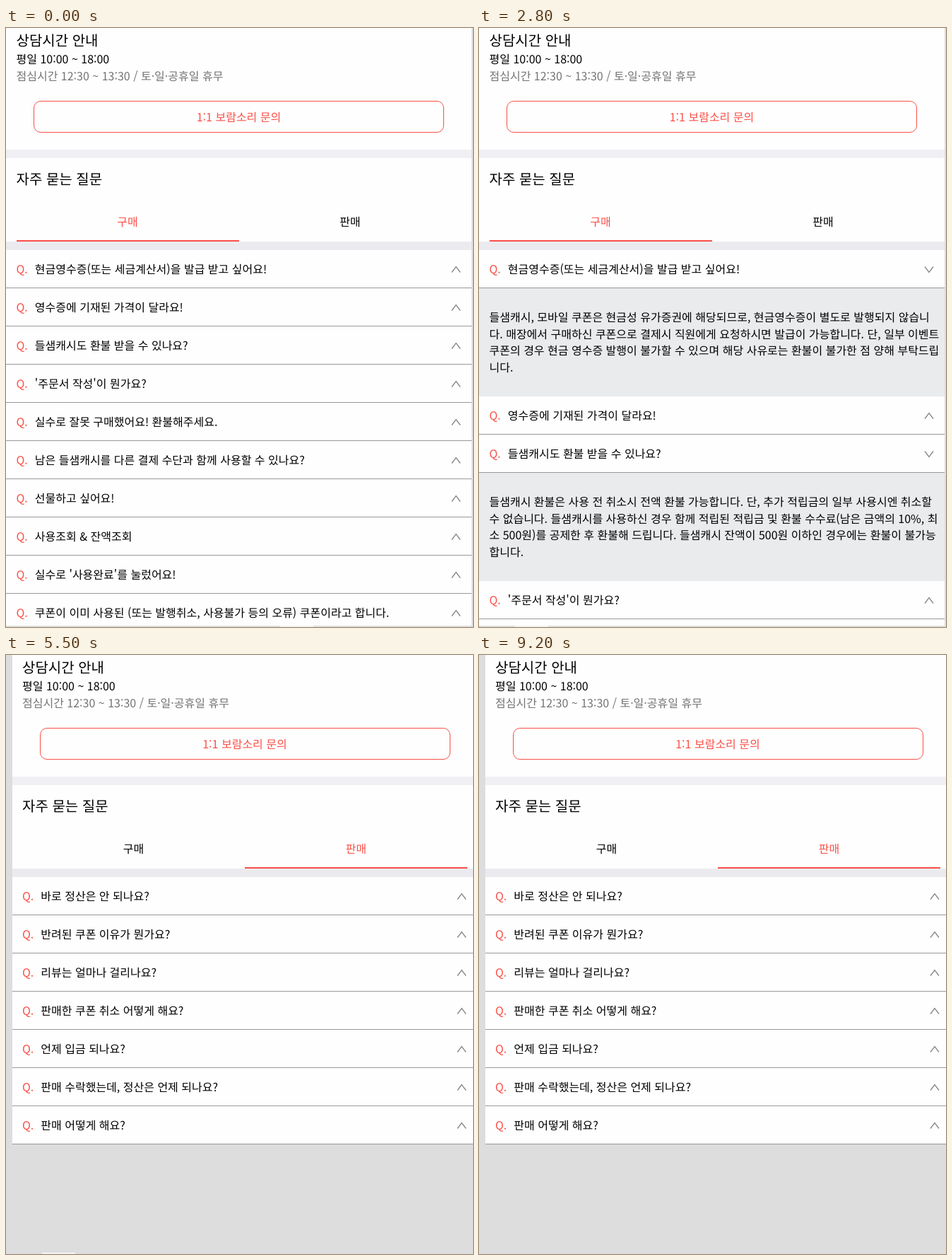
Recreate the animation shown at these times as an HTML page. Size 661 px wide and 847 px high, loop 9300 ms.

```html
<!DOCTYPE html>
<html lang="ko">
<head>
<meta charset="utf-8">
<title>자주 묻는 질문</title>
<style>
* { box-sizing: border-box; }
html, body { margin: 0; width: 100%; height: 100%; overflow: hidden; background: #ddd; }
body {
  --red: #fb4f48; --teal: #7cc7c3; --line: 2px;
  position: relative; color: #000; white-space: nowrap; text-rendering: geometricPrecision;
  font: 16px/24px "Noto Sans CJK KR", "Noto Sans CJK", "Noto Sans KR", sans-serif;
}
body.sell { --teal: #45b1aa; --line: 1px; }
.page { position: absolute; left: -.5px; top: 0; width: 660px; background: #fefefe; }
.sell .page { left: 8px; }
.edge { position: absolute; top: 0; left: 659px; width: 1px; height: 100%; background: #ddd; }
.sell .edge { left: 8px; }
.abs { position: absolute; left: 15px; }
.big { font-size: 20px; line-height: 29px; }
.head { height: 184px; border-bottom: 12px solid #f0f0f4; }
.button {
  position: absolute; left: 39.5px; top: 103px; width: 581px; height: 45px;
  border: 1px solid var(--red); border-radius: 10px;
  color: var(--red); text-align: center; line-height: 42px;
}
.faq { position: relative; }
.tabs { height: 130px; border-bottom: 12px solid #ebebef; }
.tab { position: absolute; top: 77px; width: 315px; height: 41px; text-align: center; }
.tab + .tab { left: 330px; }
.tab.on { color: var(--red); border-bottom: 2px solid var(--red); }
.row { position: relative; height: 54px; border-bottom: 1px solid #999; }
.row > * { position: absolute; top: 14px; height: 24px; }
.q { left: 15px; color: var(--red); }
.title { left: 41.3px; }
.icon { right: 15px; width: 16px; }
svg { display: block; fill: none; stroke: #858585; stroke-width: 1.3; }
.open svg { transform: scaleY(-1); transform-origin: 50% 13.5px; }
.panel {
  display: none; position: relative; height: 153px; padding: 29px 15px;
  background: #e9ebed; line-height: 23.67px; white-space: pre;
}
.sell .panel { height: 129px; }
.open .panel { display: block; }
.flash::after, .flash .row::after, .flash .panel::after, .flash .q::after, .flash .icon::after {
  content: ""; position: absolute; z-index: 2; inset: 0; height: auto;
  border: var(--line) solid var(--teal);
}
.item.flash::after { content: none; }
.flash .row::after, .flash .panel::after { inset: -1px 1px 0 0; }
.strip, .thumb { position: absolute; top: 845px; height: 2px; }
.strip { left: 0; width: 100%; background: #e0e0e0; }
.sell .strip { background: #ddd; }
.thumb { width: 47px; background: #f4f4f4; }
</style>
</head>
<body>
<div class="page">
  <div class="head">
    <div class="abs big" style="top:2px">상담시간 안내</div>
    <div class="abs" style="top:31px">평일 10:00 ~ 18:00</div>
    <div class="abs" style="top:55px;color:#737373">점심시간 12:30 ~ 13:30 / 토·일·공휴일 휴무</div>
    <div class="button">1:1 보람소리 문의</div>
  </div>
  <div class="faq">
    <div class="tabs">
      <div class="abs big" style="top:14px">자주 묻는 질문</div>
      <div class="abs tab">구매</div><div class="abs tab">판매</div>
    </div>
    <div class="list"></div><div class="list"></div>
  </div>
</div>
<div class="edge"></div>
<div class="strip"></div>
<div class="thumb"></div>
<script>
// [question, optional answer] for the buy and sell tabs
const faqs = [[
  ["현금영수증(또는 세금계산서)을 발급 받고 싶어요!",
   "들샘캐시, 모바일 쿠폰은 현금성 유가증권에 해당되므로, 현금영수증이 별도로 발행되지 않습니\n" +
   "다. 매장에서 구매하신 쿠폰으로 결제시 직원에게 요청하시면 발급이 가능합니다. 단, 일부 이벤트\n" +
   "쿠폰의 경우 현금 영수증 발행이 불가할 수 있으며 해당 사유로는 환불이 불가한 점 양해 부탁드립\n니다."],
  ["영수증에 기재된 가격이 달라요!"],
  ["들샘캐시도 환불 받을 수 있나요?",
   "들샘캐시 환불은 사용 전 취소시 전액 환불 가능합니다. 단, 추가 적립금의 일부 사용시엔 취소할\n" +
   "수 없습니다. 들샘캐시를 사용하신 경우 함께 적립된 적립금 및 환불 수수료(남은 금액의 10%, 최\n" +
   "소 500원)를 공제한 후 환불해 드립니다. 들샘캐시 잔액이 500원 이하인 경우에는 환불이 불가능\n합니다."],
  ["'주문서 작성'이 뭔가요?"],
  ["실수로 잘못 구매했어요! 환불해주세요."],
  ["남은 들샘캐시를 다른 결제 수단과 함께 사용할 수 있나요?"],
  ["선물하고 싶어요!"],
  ["사용조회 &amp; 잔액조회"],
  ["실수로 '사용완료'를 눌렀어요!"],
  ["쿠폰이 이미 사용된 (또는 발행취소, 사용불가 등의 오류) 쿠폰이라고 합니다."]
], [
  ["바로 정산은 안 되나요?"],
  ["반려된 쿠폰 이유가 뭔가요?"],
  ["리뷰는 얼마나 걸리나요?"],
  ["판매한 쿠폰 취소 어떻게 해요?"],
  ["언제 입금 되나요?"],
  ["판매 수락했는데, 정산은 언제 되나요?",
   "판매수락일 기준으로 2영업일 후 정산금에 반영되며, 그때부터 정산금 출금 가능합니다. [예시]\n" +
   "[1/1 (금)] 판매수락, [1/2, 1/3 (토,일)] 영업일 아님, [1/4 (월)] 영업일 기준 1일차, [1/5 (화)] 영\n" +
   "업일기준 2일차 -&gt; 정산금 전환 완료 정산금으로 전환 시 출금 신청 가능 합니다."],
  ["판매 어떻게 해요?"]
]];

// start time, tab, open rows, outlined rows
const ALL = [0, 1, 2, 3, 4, 5, 6];
const steps = [
  [0, 0, [], []],
  [900, 0, [0], [0]], [1200, 0, [0], []],
  [2500, 0, [0, 2], [2]], [2800, 0, [0, 2], []],
  [3600, 0, [0], [2]], [3800, 0, [0], []],
  [4500, 0, [], [0]], [4700, 0, [], []],
  [5300, 1, [], ALL], [5500, 1, [], []],
  [6700, 1, [5], [5]], [7000, 1, [5], []],
  [7900, 1, [], [5]], [8100, 1, [], []]
];
const LOOP = 9300;

const $ = s => document.querySelector(s);
const lists = [...document.querySelectorAll(".list")];
const tabs = [...document.querySelectorAll(".tab")];

const itemHtml = ([title, answer]) => `<div class="item"><div class="row"><div class="q">Q.</div>` +
  `<div class="title">${title}</div><div class="icon"><svg width="16" height="24">` +
  `<path d="M2 17.5L8 9.5L14 17.5"/></svg></div></div>` +
  (answer ? `<div class="panel">${answer}</div>` : "") + `</div>`;
lists.forEach((list, i) => list.innerHTML = faqs[i].map(itemHtml).join(""));

function show([, tab, open, flash]) {
  document.body.classList.toggle("sell", tab === 1);
  tabs.forEach((el, i) => el.classList.toggle("on", i === tab));
  lists.forEach((el, i) => el.style.display = i === tab ? "block" : "none");
  [...lists[tab].children].forEach((el, i) => {
    el.classList.toggle("open", open.includes(i));
    el.classList.toggle("flash", flash.includes(i));
  });
  $(".faq").classList.toggle("flash", flash === ALL);
}

const start = performance.now();
const thumb = $(".thumb").style;
let current;
function run() {
  const t = (performance.now() - start) % LOOP;
  const step = steps.findLast(s => s[0] <= t);
  if (step !== current) show(current = step);
  thumb.left = t < 900 ? "388px" : "51px";
  thumb.display = t < 9200 ? "block" : "none";
  requestAnimationFrame(run);
}
run();
</script>
</body>
</html>
```
